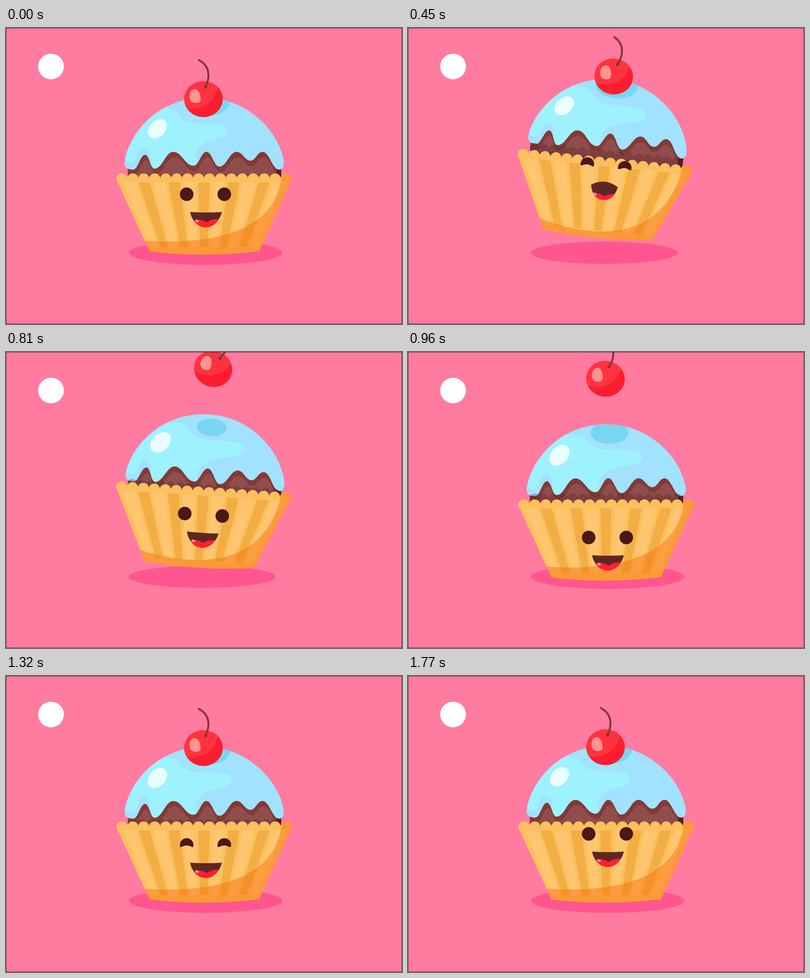
Write an HTML page that moves like this. It is 800 by 600 pixels and loops after 1.8 s.

```html
<!DOCTYPE html>
<html lang="en">
<head>
<meta charset="utf-8">
<title>Jumping cupcake</title>
<style>
html, body { margin: 0; width: 100%; height: 100%; overflow: hidden; background: #ff7ba0; }
svg { display: block; width: 800px; height: 600px; }
</style>
</head>
<body>
<svg viewBox="0 0 800 600">
  <defs>
    <clipPath id="cupClip"><path class="cup"/></clipPath>
    <clipPath id="icingClip"><path class="icing"/></clipPath>
    <clipPath id="cakeClip"><path class="cake"/></clipPath>
    <clipPath id="mouthClip"><path class="mouth"/></clipPath>
    <clipPath id="cherryClip"><ellipse cx="399" cy="144.3" rx="39" ry="36.4"/></clipPath>
  </defs>

  <rect width="800" height="600" fill="#ff7ba0"/>
  <circle cx="91" cy="78" r="26" fill="#fff"/>
  <ellipse id="floor" fill="#ff568f"/>

  <g id="dome">
    <path class="cake" fill="#833a36"/>
    <g clip-path="url(#cakeClip)">
      <path id="crumb" fill="#914d4b" transform="translate(2 11)"/>
      <path d="M560 284V300L530 362H490Q540 335 548 284Z" fill="#5a1f1c"/>
    </g>
    <path class="icing" fill="#a1e2ff"/>
    <g clip-path="url(#icingClip)">
      <path id="glaze" fill="#9ef1ff"/>
      <ellipse id="dent" cx="407" fill="#7ad5f2"/>
    </g>
    <ellipse id="gloss" rx="16" ry="22.5" fill="#eafeff"/>
  </g>

  <g id="ghost">
    <path class="cup" fill="#4a1c24" fill-opacity=".28"/>
    <path class="dark" fill="#5c1010" fill-opacity=".5"/>
  </g>

  <g id="cup">
    <path class="cup" fill="#fdc05e"/>
    <g clip-path="url(#cupClip)">
      <path id="light" fill="#fec670"/>
      <path class="dark" fill="#f2ae44"/>
      <path id="shade" fill="#f56a08" fill-opacity=".45"/>
    </g>
    <g id="face">
      <path id="eyes" fill="#4a1815"/>
      <path class="mouth" fill="#5e2723"/>
      <g clip-path="url(#mouthClip)">
        <g id="tongue">
          <path d="M370 392Q390 380 405 391Q419 381 438 386V412H370Z" fill="#ff1f33"/>
          <ellipse cx="386" cy="388" rx="4" ry="2.6" fill="#ff8f8f" transform="rotate(15 386 388)"/>
        </g>
      </g>
    </g>
  </g>

  <g id="cherry">
    <g clip-path="url(#cherryClip)">
      <rect x="355" y="100" width="90" height="90" fill="#fb1e30"/>
      <path d="M355 100H429C431 140 408 171 355 162Z" fill="#ff333f"/>
    </g>
    <path d="M382 124C390 125 394 138 393 147C391 154 376 154 372 146C368 136 373 123 382 124Z" fill="#ff9490"/>
    <path d="M389.5 65C411 76 413 97 404 118" fill="none" stroke="#873833" stroke-width="4" stroke-linecap="round"/>
    <circle cx="403.5" cy="119" r="3.4" fill="#873833"/>
  </g>

  <rect x=".5" y=".5" width="799" height="599" fill="none" stroke="#000" stroke-opacity=".55"/>
</svg>
<script>
const LOOP = 1800, STEP = 30;
const $ = id => document.getElementById(id);
const setAll = (name, d) => document.querySelectorAll('.' + name).forEach(p => p.setAttribute('d', d));
const set = (id, attrs) => {
  for (const k in attrs) $(id).setAttribute(k, attrs[k]);
};

// Wrapper: body, scalloped rim and pleats
const repeat = (n, make) => Array.from({ length: n }, (_, i) => make(i)).join('');
const rim = repeat(16, i => `M${222.8 + i * 22.13} 306a11.2 11.2 0 1 1 22.4 0a11.2 11.2 0 1 1 -22.4 0Z`);
setAll('cup', `M223.5 308H576.5L511 452.5Q400 466 290 453Z${rim}`);
const pleats = (n, top, topW, foot, footW) => repeat(n, i =>
  `M${top + 60.5 * i - topW / 2} 313h${topW}L${foot + 40 * i + footW / 2} 444h${-footW}Z`);
setAll('dark', pleats(5, 279, 23, 319.5, 15));
set('light', { d: pleats(6, 249, 25, 299.5, 14) });

// Icing edge: a wave through its high and low points, level at each
const edge = [[552, 287], [518, 251], [494, 269], [466, 251], [431, 281], [405, 251],
  [379, 279], [338, 251], [300, 285], [281, 257], [257, 287]];
const drips = edge.slice(1).map(([x, y], i) => {
  const [px, py] = edge[i], bend = (x - px) * .43;
  return `C${px + bend} ${py} ${x - bend} ${y} ${x} ${y}`;
}).join('');
setAll('icing', 'M240 270C244 242 262 208 290 183C322 155 360 141.5 400 141.5'
  + 'C440 141.5 478 155 510 183C539 208 557 242 561 270C562 281 558 287 552 287'
  + drips + 'C245 287 238 283 240 270Z');
setAll('cake', 'M246 250H556V300L530 360H270L246 300Z');
set('crumb', { d: `M552 287${drips}L260 370H545Z` });

// c = 0 is an open round eye, c = 1 a closed arch
function eye(x, c) {
  const r = 13.7, d = 337 + r * (1 - c), p = 7.6 + 1.4 * c;
  return `M${x - r} 337a${r} ${r} 0 0 1 ${2 * r} 0C${x + r} ${337 + p} ${x + p} ${d} ${x} ${d}`
    + `C${x - p} ${d} ${x - r} ${337 + p} ${x - r} 337Z`;
}

// l = 0 is a smile, l = 1 a laugh
function mouth(l) {
  const x = 404, w = 32.2 - 5 * l, y = 373 + 5 * l, b = y + 31 - 3 * l;
  return `M${x - w} ${y}Q${x} ${y + 2 - 20 * l} ${x + w} ${y}`
    + `C${x + w - 5} ${y + 19} ${x + 14} ${b} ${x} ${b}C${x - 15} ${b} ${x - w + 4} ${y + 19} ${x - w} ${y}Z`;
}

function draw(t) {
  const ease = (from, to) => {
    const u = Math.min(1, Math.max(0, (t - from) / (to - from)));
    return u * u * (3 - 2 * u);
  };
  const bump = (from, peak, to) => ease(from, peak) - ease(peak, to);

  // Wrapper and its shadow
  const hop = bump(295, 620, 920), lean = hop ** .4, tilt = 12.4 * hop;
  const cupY = 4 * bump(860, 960, 1140) - 71 * hop;
  const cupMove = `translate(${-10 * hop * hop} ${cupY}) rotate(${tilt} 400 305)`;
  const far = bump(393, 620, 875);
  set('cup', { transform: cupMove });
  set('floor', { cx: 403.5 - 46.5 * far, cy: 455.5 + far, rx: 155 - 42 * far, ry: 24.7 - 13.5 * far });
  set('shade', {
    d: `M270 431H280C${400 - 20 * lean} ${440 + 30 * lean} ${540 - 15 * lean} ${420 + 55 * lean} 556 306V290H600V470H270Z`
  });

  // Cake and icing fly higher, then settle slowly
  const flight = bump(349, 620, 865), settle = ease(780, 960) - ease(1180, 1440);
  const domeY = 5 * settle - 119 * flight;
  set('dome', { transform: `translate(${2 * hop} ${domeY}) rotate(${tilt} 404.5 287)` });
  set('ghost', {
    transform: `${cupMove} translate(400 ${305 - 50 * flight - 13 * settle}) scale(.87) translate(-400 -305)`
  });
  const flow = 30 * (ease(300, 500) - ease(760, 1600)), half = flow / 2;
  set('glaze', {
    d: `M230 130L${310 + half} 163C${348 + half} 157 ${348 + half} 180 ${362 + half} 188`
      + `C${385 + half} 200 ${448 + flow} 184 ${448 + flow} 207C${448 + flow} 232 ${405 + half} 220 ${390 + half / 2} 242`
      + 'C381 255 387 266 384 285H292C292 262 291 242 278 242C262 242 270 272 254 273C246 273 240 265 230 262Z'
  });
  const bare = bump(380, 700, 1170);
  set('dent', { cy: 150 + 20 * bare, rx: 45 - 17 * bare, ry: 28 - 12 * bare });
  const swell = 1 + .07 * (ease(450, 600) - ease(1200, 1440));
  set('gloss', { transform: `translate(306 204.5) rotate(42) scale(${swell})` });

  // Cherry is tossed off and drops back last
  const toss = 95 * (ease(373, 785) - ease(1080, 1330));
  set('cherry', {
    transform: `translate(${54 * bump(350, 620, 940)} ${domeY - toss}) rotate(${26 * bump(300, 720, 1080)} 399 144)`
  });

  // Face slides between low, high and thrown; its first drop spans the loop seam
  const drop = ease(-59, 76) + ease(LOOP - 59, LOOP + 76);
  const faceY = -24 + 59 * drop - 90 * ease(215, 600) + 90 * ease(620, 895) - 59 * ease(1200, 1440);
  const squint = bump(100, 430, 590) + ease(1000, 1380) - ease(1640, 1750);
  const laugh = bump(300, 440, 580);
  set('face', { transform: `translate(0 ${faceY})` });
  set('eyes', { d: eye(365, squint) + eye(441, squint) });
  setAll('mouth', mouth(laugh));
  set('tongue', { transform: `translate(0 ${3 + 5 * laugh})` });
}

const start = performance.now();
function tick() {
  const t = Math.max(0, performance.now() - start) % LOOP;
  draw(Math.floor(t / STEP) * STEP);
  requestAnimationFrame(tick);
}
tick();
</script>
</body>
</html>
```
